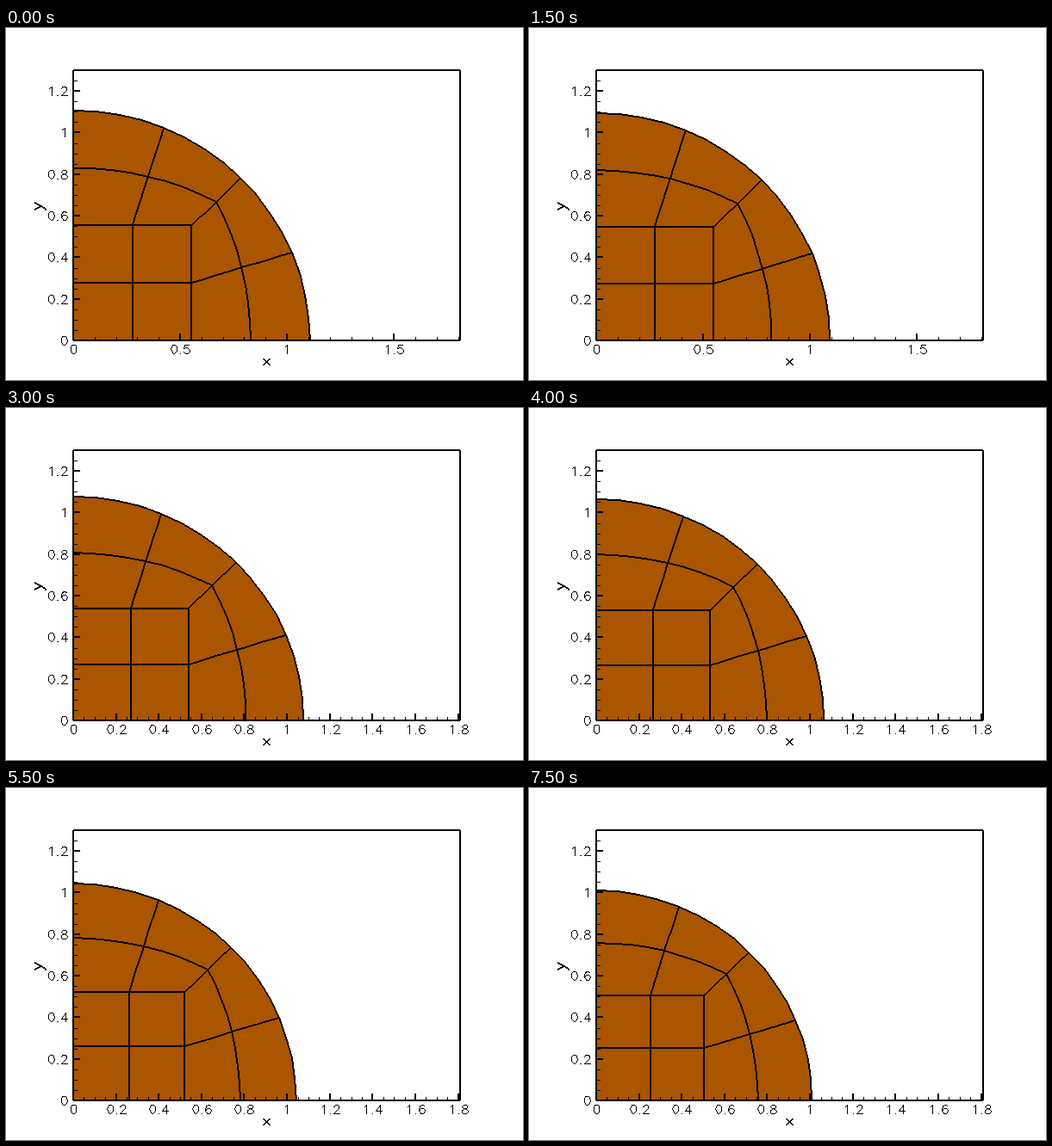
Animation of 600x409 px, one loop 8 s. Source, as a matplotlib script:

```python
import numpy as np
import matplotlib.pyplot as plt
from matplotlib.animation import FuncAnimation

W, H, DPI = 600, 409, 64
X0, Y0, X1, Y1 = 78, 363, 527, 49  # plot frame
OX, OY = 78, 363.1                 # data origin
SX, SY = 248.1, 241.65             # pixels per unit
FRAMES, STEP = 16, 500
FINE_TICKS_AT = 6
BROWN = "#aa5500"


def stroke(ink, points, width=2):
    """Hard-edged polyline; width is counted across the minor axis."""
    pts = np.rint(points).astype(int)
    for a, b in zip(pts, pts[1:]):
        steep = abs(b[1] - a[1]) > abs(b[0] - a[0])
        if steep:
            a, b = a[::-1], b[::-1]
        if a[0] > b[0]:
            a, b = b, a
        k = np.arange(a[0], b[0] + 2 - width)
        t = (k - a[0] + (width - 1) / 2) / max(b[0] - a[0], 1)
        m = np.floor(a[1] + (b[1] - a[1]) * t + 0.5).astype(int)
        for w in range(width):
            if steep:
                ink[k, m - w] = True
            else:
                ink[m - w, k] = True


def arc(cx, cy, rx, ry, a, b, n=13):
    t = np.radians(np.linspace(a, b, n))
    return list(zip(cx + rx * np.cos(t), cy + ry * np.sin(t)))


# Stroke digits on a 20 x 21 grid
GLYPHS = {
    "0": [arc(10, 10.5, 7, 10.5, 0, 360)],
    "1": [[(6, 17), (8, 18), (11, 21), (11, 0)]],
    "2": [arc(10, 15.5, 6, 5.5, 180, -30) + [(3, 0), (17, 0)]],
    "4": [[(13, 21), (3, 7), (18, 7)], [(13, 21), (13, 0)]],
    "5": [[(15, 21), (5, 21), (4, 12)] + arc(10, 7, 7, 7, 130, -155)],
    "6": [arc(11, 11, 7, 10, 45, 180) + arc(10.5, 6.5, 6.5, 6.5, 180, -180)],
    "8": [arc(10, 16.5, 6, 4.5, -90, 270) + arc(10, 6, 7, 6, 90, 450)],
    ".": [[(4, 0), (6, 0)]],
}
SCALE = 0.49


def advance(c):
    return (10 if c == "." else 20) * SCALE


def label(ink, text, x, base, align):
    x -= sum(map(advance, text)) * align
    for c in text:
        for path in GLYPHS[c]:
            p = np.array(path) * SCALE
            stroke(ink, np.column_stack((np.floor(x + p[:, 0]),
                                         base - p[:, 1])), 1)
        x += advance(c)


def x_axis(ink, major, minor):
    per = round(major / minor)
    for i in range(int(1.81 / minor + 1e-6) + 1):
        x = round(OX + i * minor * SX)
        if i % per:
            stroke(ink, [(x, Y0 - 1), (x, Y0 - 4)], 1)
        else:
            stroke(ink, [(x, Y0), (x, Y0 - 8)])
            label(ink, f"{i * minor:.3g}", x + 0.5, 378, 0.5)


def y_axis(ink):
    for i in range(26):
        y = round(OY - i * 0.05 * SY)
        if i % 4:
            stroke(ink, [(X0, y), (X0 + 4, y)], 1)
        else:
            stroke(ink, [(X0, y), (X0 + 8, y)])
            label(ink, f"{i * 0.05:.3g}", 72.5, y + 5, 1)


def plot_frame(major, minor):
    ink = np.zeros((H, W), bool)
    stroke(ink, [(X0, Y0), (X1, Y0), (X1, Y1), (X0, Y1), (X0, Y0)])
    y_axis(ink)
    x_axis(ink, major, minor)
    # Axis titles
    stroke(ink, [(299, 384), (306, 392)])
    stroke(ink, [(306, 384), (299, 392)])
    stroke(ink, [(33, 211), (41, 207)])
    stroke(ink, [(33, 203), (41, 207), (44, 209), (46, 210), (46, 212)])
    return ink


def mesh_lines():
    """Unit-radius mesh: a square core blended into a quarter circle."""
    u = np.linspace(0, 1, 9)

    def ring(u, w):
        a = u * np.pi / 4
        return ((1 - w) * 0.5 + w * np.cos(a),
                (1 - w) * 0.5 * u + w * np.sin(a))

    half = [ring(u, w) for w in (0, 0.5, 1)]
    half.append(ring(np.full(9, 0.5), u))
    half.append((np.full(9, 0.25), u / 2))
    return half + [(y, x) for x, y in half] + [ring(np.ones(9), u)]


def to_px(x, y, r):
    return np.rint(np.column_stack((OX + SX * r * x, OY - SY * r * y)))


coarse, fine = plot_frame(0.5, 0.1), plot_frame(0.2, 0.05)
mesh = mesh_lines()
t = np.radians(np.linspace(0, 90, 17))
rim_x, rim_y = np.append(np.cos(t), 0), np.append(np.sin(t), 0)

fig = plt.figure(figsize=(W / DPI, H / DPI), dpi=DPI, facecolor="white")
ax = fig.add_axes([0, 0, 1, 1])
ax.axis("off")
disc = ax.fill([X0, X0, X0], [Y0, Y0, Y0], color=BROWN, lw=0,
               antialiased=False, zorder=1)[0]
layer = ax.imshow(np.zeros((H, W, 4), np.uint8), extent=(0, W, H, 0),
                  interpolation="nearest", aspect="auto", zorder=2)
ax.set_xlim(0, W)
ax.set_ylim(H, 0)


def update(n):
    r = 1.1067 - 0.00413 * n - 0.000156 * n * n
    disc.set_xy(to_px(rim_x, rim_y, r))
    ink = (coarse if n < FINE_TICKS_AT else fine).copy()
    for x, y in mesh:
        stroke(ink, to_px(x, y, r))
    rgba = np.zeros((H, W, 4), np.uint8)
    rgba[..., 3] = ink * 255
    layer.set_data(rgba)
    return disc, layer


anim = FuncAnimation(fig, update, frames=FRAMES, interval=STEP,
                     repeat=True, repeat_delay=0, blit=False)
plt.show()
```
